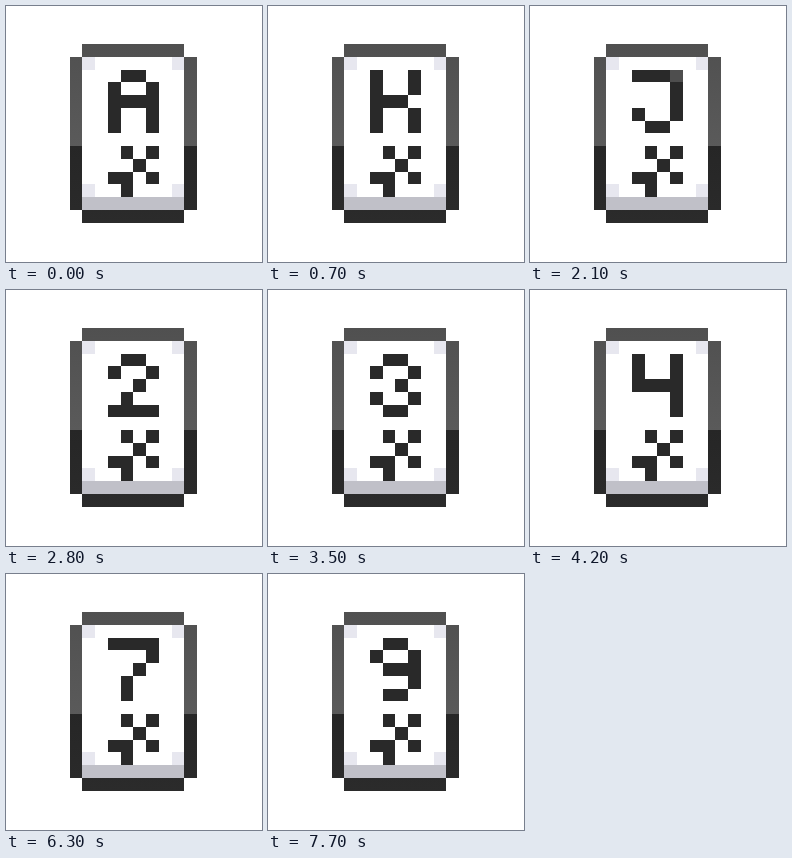
Recreate the animation shown at these times as an HTML page. Size 256 by 256 pixels, loop 8000 ms.

```html
<!DOCTYPE html>
<html lang="en">
<head>
<meta charset="utf-8">
<title>Pixel card</title>
<style>
  html, body { margin: 0; width: 100%; height: 100%; overflow: hidden; background: #fff; }
  svg { display: block; width: 100vw; height: 100vh; }
</style>
</head>
<body>
<svg id="stage" viewBox="0 0 256 256" shape-rendering="crispEdges">
  <defs>
    <linearGradient id="gloss" gradientUnits="userSpaceOnUse" x1="0" y1="38" x2="0" y2="217">
      <stop offset="0" stop-color="#505050"/>
      <stop offset=".5698" stop-color="#5a5a5a"/>
      <stop offset=".5698" stop-color="#262626"/>
      <stop offset="1" stop-color="#2b2b2b"/>
    </linearGradient>
  </defs>
  <path id="frame" fill="url(#gloss)"/>
  <path id="lip" fill="#c0c0c8"/>
  <path id="corners" fill="#e7e7ef"/>
  <path id="suit" fill="#292929"/>
  <path id="rank" fill="#292929"/>
  <path id="soft" fill="#4e4e4e"/>
</svg>
<script>
const STEP = 700, LOOP = 8000;

// Ranks on a 4 x 5 grid: X is solid ink, + is softened ink.
const RANKS = [
  '.XX. X..X XXXX X..X X..X',
  'X..X X..X XXX. X..X X..X',
  '.XX. X..X X..X .XX. ...X',
  'XXX+ ...X ...X X..X .XX.',
  '.XX. X..X ..X. .X.. XXXX',
  '.XX. X..X ..X. X..X .XX.',
  'X..X X..X XXXX ...X ...X',
  '+XXX X... +XX. ...X XXX+',
  '.XX. X... XXX. X..X .XX.',
  'XXXX ...X ..X. .X.. .X..',
  '.XX. X..X .XX. X..X .XX.',
  '.XX. X..X .XXX ...X .XX.'
];
const SUIT = '.X.X ..X. XX.X .X..';

const edge = k => Math.ceil(k * 12.75 - 0.5);
const block = (x, y, w = 1, h = 1) =>
  `M${edge(x)} ${edge(y)}H${edge(x + w)}V${edge(y + h)}H${edge(x)}Z`;
const glyph = (rows, x, y, mark) => rows.split(' ').map((row, j) =>
  [...row].map((c, i) => c === mark ? block(x + i, y + j) : '').join('')).join('');
const setPath = (id, d) => document.getElementById(id).setAttribute('d', d);

setPath('frame', block(6, 3, 8) + block(6, 16, 8) + block(5, 4, 1, 12) + block(14, 4, 1, 12));
setPath('lip', block(6, 15, 8));
setPath('corners', block(6, 4) + block(13, 4) + block(6, 14) + block(13, 14));
setPath('suit', glyph(SUIT, 8, 11, 'X'));

let shown = -1;
function render(time) {
  const index = Math.floor((time % LOOP) / STEP);
  if (index !== shown) {
    shown = index;
    setPath('rank', glyph(RANKS[index], 8, 5, 'X'));
    setPath('soft', glyph(RANKS[index], 8, 5, '+'));
  }
}

const start = performance.now();
function tick() {
  render(performance.now() - start);
  requestAnimationFrame(tick);
}
tick();
</script>
</body>
</html>
```
